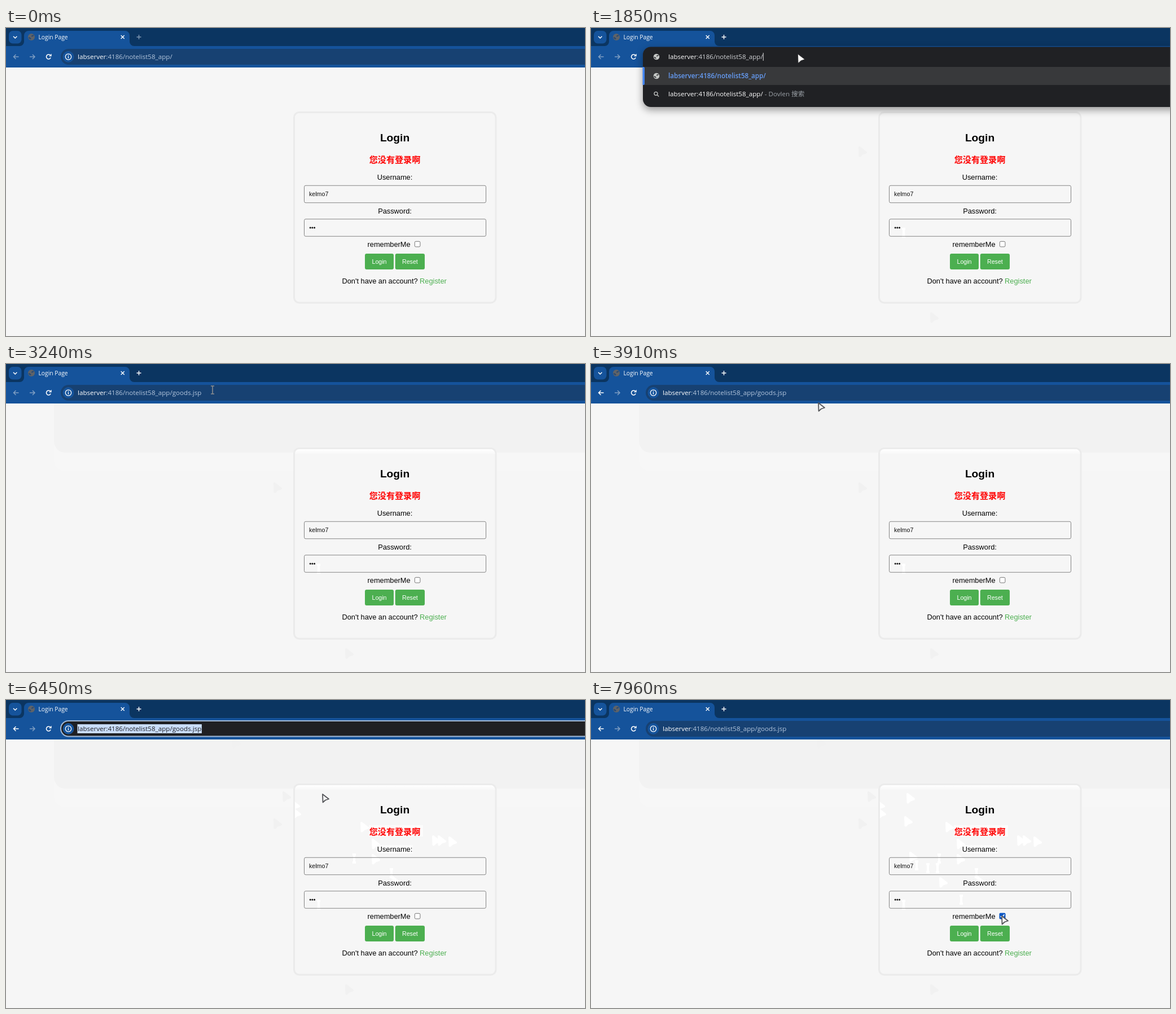
An HTML page with a canvas that plays this animation: 1026x546 px, repeating every 8 s.

```html
<!DOCTYPE html>
<html lang="en">
<head>
<meta charset="utf-8">
<title>Login Page</title>
<style>
html, body { margin: 0; width: 100%; height: 100%; overflow: hidden; background: #f6f6f6; }
canvas { display: block; }
</style>
</head>
<body>
<canvas id="stage" width="1026" height="546"></canvas>
<script>
const c = document.getElementById('stage').getContext('2d');
const LOOP = 8000;
const ARIAL = '"Liberation Sans", Arial, sans-serif';
const UI = '"Open Sans", "Noto Sans CJK SC", "Noto Sans CJK", sans-serif';
const CJK = '"Noto Sans CJK SC", "Noto Sans CJK", sans-serif';
const URL_FONT = '11.6px ' + UI, URL_BOLD = '600 11.6px ' + UI;
const HOST = 'labserver', PATH = ':4186/notelist58_app/', BASE = HOST + PATH, FILE = 'goods.jsp';
const BLUE = '#15539b', PAGE = '#f6f6f6', LINK = '#669df6';

const OPEN = 1760, ENTER = 3240;
// time, typed tail, suggestion rows
const TYPED = [
  [OPEN, '', 'us'], [2110, 'g', 'us'], [2450, 'go', 'uls'],
  [2640, 'goo', 'uls'], [2750, FILE, 'ls']
];

// the pointer passes the points of a stroke at an even pace, then rests
const moves = [];
let last = [602, 505];
function stroke(from, to, ...xy) {
  moves.push({ t: from, x: last[0], y: last[1], trace: true });
  const n = xy.length / 2;
  for (let i = 0; i < n; i++) {
    last = xy.slice(i * 2, i * 2 + 2);
    moves.push({ t: from + (to - from) * (i + 1) / n, x: last[0], y: last[1], trace: i < n - 1 });
  }
}
stroke(150, 620, 554, 363, 475, 211, 424, 149, 385, 116, 375, 104, 371, 83, 366, 46);
stroke(3870, 3910, 402, 68);
stroke(3950, 4560, 491, 163, 509, 193, 617, 281, 649, 274, 683, 307, 684, 313, 756, 241, 766, 241, 785, 243);
stroke(4700, 4840, 649, 247, 629, 217);
stroke(5030, 5160, 503, 190);
stroke(5370, 5960, 507, 179, 400, 52, 384, 53);
stroke(6110, 6160, 381, 56);
stroke(6340, 6450, 560, 166);
stroke(6500, 6620, 556, 207);
stroke(6760, 6960, 565, 270, 577, 293, 597, 298, 614, 298);
stroke(7240, 7300, 618, 315);
stroke(7460, 7780, 656, 354, 727, 382);

// areas where the pointer is a text beam: x, y, w, h
const FIELDS = [[528, 279, 323, 31], [528, 338.5, 323, 31]];
const TEXTS = [[97, 37, 929, 28], [663, 305, 56, 6], ...FIELDS];
const inside = (x, y, [l, t, w, h]) => x >= l && x <= l + w && y >= t && y <= t + h;
const isBeam = (x, y) => TEXTS.some(r => inside(x, y, r));
const between = (t, a, b) => t >= a && t < b;

function rect(x, y, w, h, r, fill, line, lw = 1) {
  c.beginPath();
  c.roundRect(x, y, w, h, r);
  if (fill) { c.fillStyle = fill; c.fill(); }
  if (line) { c.strokeStyle = line; c.lineWidth = lw; c.stroke(); }
}

function disc(x, y, r, fill, line, lw = 1) {
  c.beginPath();
  c.arc(x, y, r, 0, 7);
  if (fill) { c.fillStyle = fill; c.fill(); }
  if (line) { c.strokeStyle = line; c.lineWidth = lw; c.stroke(); }
}

function lines(color, lw, ...paths) {
  c.strokeStyle = color;
  c.lineWidth = lw;
  c.beginPath();
  for (const p of paths)
    for (let i = 0; i < p.length; i += 2) c[i ? 'lineTo' : 'moveTo'](p[i], p[i + 1]);
  c.stroke();
}

function text(s, x, y, font, color, align = 'left') {
  c.font = font;
  c.fillStyle = color;
  c.textAlign = align;
  c.fillText(s, x, y);
  return x + c.measureText(s).width;
}

// runs of [string, color, font], returns the end x
const runs = (x, y, list) =>
  list.reduce((at, [s, color, font = URL_FONT]) => text(s, at, y, font, color), x);

function pointerAt(t) {
  let i = 1;
  while (i < moves.length - 1 && moves[i].t < t) i++;
  const a = moves[i - 1], b = moves[i];
  const k = Math.min(1, Math.max(0, (t - a.t) / (b.t - a.t)));
  return [a.x + (b.x - a.x) * k, a.y + (b.y - a.y) * k];
}

function arrowPath(x, y) {
  c.beginPath();
  c.moveTo(x + 1, y + 1);
  c.lineTo(x + 12, y + 9.5);
  c.lineTo(x + 6, y + 11.5);
  c.lineTo(x + 1.5, y + 15.5);
  c.closePath();
}

function beam(x, y, color, lw) {
  lines(color, lw, [x - 3, y - 7, x + 3, y - 7], [x, y - 7, x, y + 7], [x - 3, y + 7, x + 3, y + 7]);
}

function pointer(t) {
  if (t < moves[0].t) return;
  const [x, y] = pointerAt(t), dark = y < 64;
  if (isBeam(x, y) && !between(t, OPEN, ENTER)) return beam(x, y, dark ? '#8b8d90' : '#555', 1.6);
  c.lineJoin = 'round';
  arrowPath(x, y);
  c.fillStyle = dark ? '#fff' : '#f4f4f4';
  c.fill();
  c.strokeStyle = dark ? '#3a3a3c' : '#55565a';
  c.lineWidth = 1.8;
  c.stroke();
  if (dark) c.fill();
  c.lineJoin = 'miter';
}

// faint marks left behind the pointer
function traces(t, inCard) {
  const color = inCard ? '#fff' : '#f1f1f1';
  c.lineJoin = 'round';
  for (const m of moves) {
    if (!m.trace || t < m.t + 50 || (m.x > 502 && m.y < 480) !== inCard) continue;
    if (m.t < OPEN && t >= OPEN && m.y < 165) continue;
    if (isBeam(m.x, m.y)) { beam(m.x, m.y, color, 4); continue; }
    arrowPath(m.x, m.y);
    c.fillStyle = c.strokeStyle = color;
    c.lineWidth = 4;
    c.fill();
    c.stroke();
  }
  c.lineJoin = 'miter';
}

function button(x, w, label) {
  rect(x, 400, w, 28, 3, '#4caf50');
  text(label, x + w / 2, 417.5, '10.67px ' + ARIAL, '#fff', 'center');
}

function card(t) {
  rect(510.5, 149.5, 357.5, 337.5, 9, PAGE, '#ebebeb', 3);
  c.save();
  c.beginPath();
  c.roundRect(512, 151, 354.5, 334.5, 8);
  c.clip();
  if (t >= ENTER) {
    const g = c.createLinearGradient(0, 151, 0, 160);
    g.addColorStop(0, '#fff');
    g.addColorStop(1, '#f7f7f7');
    c.fillStyle = g;
    c.fillRect(512, 151, 355, 9);
  }
  traces(t, true);
  c.restore();
}

function mark(t, on, ...box) {
  if (!on && t < 5200) return;
  c.fillStyle = on ? '#3367d1' : '#fcfcfc';
  c.fillRect(...box);
}

function form(t) {
  const pickHead = between(t, 4800, 5200), pickUser = between(t, 4730, 5200);
  mark(t, pickHead, 643, 222, 96, 20);
  mark(t, pickUser, 657, 257, 63.5, 15);

  const mid = 689, body = '12.8px ' + ARIAL;
  text('Login', mid, 201, 'bold 19.2px ' + ARIAL, '#000', 'center');
  text('您没有登录啊', mid, 238.7, 'bold 15.1px ' + CJK, pickHead ? '#fff' : '#f00', 'center');
  text('Username:', mid, 269, body, pickUser ? '#fff' : '#000', 'center');
  text('Password:', mid, 329, body, '#000', 'center');

  const [px, py] = pointerAt(t);
  for (const f of FIELDS) {
    const [x, y, w, h] = f;
    rect(x + .5, y + .25, w - 1, h - .5, 2.5, null, inside(px, py, f) ? '#555' : '#858585');
  }
  text('kelmo7', 537, 298, '10.67px ' + ARIAL, '#111');
  for (let i = 0; i < 3; i++) disc(539.2 + i * 3.7, 354, 1.5, '#111');

  text('rememberMe', 640.5, 388.3, body, '#000');
  if (t >= 7880) {
    rect(723.5, 377.5, 11, 11, 2, '#0b57c4');
    lines('#fff', 1.6, [725.8, 383.2, 728.2, 385.6, 732.4, 380.2]);
  } else {
    rect(724.3, 378.3, 9.6, 9.6, 2, '#fff', '#767676');
  }
  button(636, 51, 'Login');
  button(689.7, 52.3, 'Reset');
  const end = text("Don't have an account? ", 595.5, 453, body, '#000');
  text('Register', end, 453, body, '#4caf50');
}

function page(t) {
  c.fillStyle = PAGE;
  c.fillRect(0, 0, 1026, 546);
  if (t >= ENTER) {
    rect(85, 40, 960, 150, 20, '#f7f7f7');
    rect(85, 40, 960, 117, 20, '#f2f2f2');
  }
  traces(t, false);
  card(t);
  form(t);
}

function globe(x, y, r, color, gap) {
  disc(x, y, r, color);
  c.save();
  c.clip();
  c.fillStyle = gap;
  c.beginPath();
  c.ellipse(x - r * .45, y + r * .35, r * .45, r * .22, .6, 0, 7);
  c.ellipse(x + r * .35, y - r * .35, r * .4, r * .2, -.4, 0, 7);
  c.fill();
  c.restore();
}

function arrow(x, dir, color) {
  lines(color, 1.5, [x - 4.5 * dir, 51, x + 4.5 * dir, 51], [x + .5 * dir, 47, x + 4.5 * dir, 51, x + .5 * dir, 55]);
}

function tab() {
  c.fillStyle = BLUE;
  c.beginPath();
  c.moveTo(24, 32);
  c.arcTo(32, 32, 32, 24, 8);
  c.arcTo(32, 5, 40, 5, 8);
  c.arcTo(219, 5, 219, 13, 8);
  c.arcTo(219, 32, 227, 32, 8);
  c.fill();
  globe(45, 16, 6, '#5f6368', '#2c4a70');
  text('Login Page', 57.5, 20, '10.3px ' + UI, '#fff');
  lines('#fff', 1.4, [203.7, 13, 209.7, 19], [209.7, 13, 203.7, 19]);
}

function toolbar(t) {
  c.fillStyle = '#0b3561';
  c.fillRect(0, 0, 1026, 32);
  c.fillStyle = BLUE;
  c.fillRect(0, 32, 1026, 38);
  rect(5, 5, 22.5, 22.5, 7, BLUE);
  lines('#fff', 1.5, [13, 14.8, 16.2, 18, 19.4, 14.8]);
  tab();
  lines(t < 760 ? '#8199b3' : '#fff', 1.4, [231.5, 16, 239.5, 16], [235.5, 12, 235.5, 20]);

  const dim = '#7f9fc4';
  arrow(18, -1, t < 3330 ? dim : '#fff');
  arrow(46.5, 1, dim);
  c.strokeStyle = c.fillStyle = '#fff';
  c.lineWidth = 1.6;
  c.beginPath();
  c.arc(75.5, 51, 4, .4, 5.5);
  c.stroke();
  c.beginPath();
  c.moveTo(80.6, 45.6);
  c.lineTo(80.6, 50.2);
  c.lineTo(76, 50.2);
  c.fill();
}

function caret(x) {
  lines('#e8e8e8', 1, [x + .5, 44, x + .5, 58]);
}

function address(t) {
  const again = between(t, 5880, 6680);
  const focus = between(t, 760, ENTER) || again;
  const picked = between(t, 760, 1420) || again;
  if (focus) rect(97, 37, 960, 27.5, 13.7, '#1f2023', '#a3bad6', 2);
  else rect(97, 37, 960, 28, 14, '#174172');
  disc(110.5, 51, 10, BLUE);
  disc(110.5, 51, 5.2, null, '#fff', 1.3);
  c.fillStyle = '#fff';
  c.fillRect(109.8, 50, 1.4, 3.6);
  c.fillRect(109.8, 47.8, 1.4, 1.3);

  const tail = PATH + (t >= ENTER ? FILE : '');
  if (picked) {
    c.font = URL_FONT;
    c.fillStyle = '#c9ddfa';
    c.fillRect(126.5, 43, c.measureText(HOST + tail).width + 1, 16);
  }
  const end = runs(127, 55, [
    [HOST, picked ? '#1f2023' : '#fff'],
    [tail, picked ? '#1f2023' : focus ? '#c4c7cc' : '#b4c6dd']
  ]);
  if (focus && !picked) caret(end);
}

function dropdown(t) {
  const [, tail, rows] = TYPED.filter(s => s[0] <= t).pop();
  const bottom = 76 + rows.length * 32;
  c.save();
  c.shadowColor = 'rgba(0,0,0,.4)';
  c.shadowBlur = 14;
  c.shadowOffsetY = 5;
  rect(92, 33.5, 970, bottom - 33.5, 14, '#202124');
  c.restore();
  c.fillStyle = '#38393b';
  c.fillRect(92, 69, 934, 32);
  rect(91.5, 69, 3.5, 32, [0, 2, 2, 0], '#4285f4');

  const icon = '#c4c7c5', gap = '#3b3c3f', grey = '#9aa0a6';
  globe(116, 51, 5.3, icon, gap);
  caret(runs(137, 55, [[HOST, '#fff'], [PATH + tail, '#cfd1d4']]));

  const n = tail.length, title = 'Goods List', m = Math.min(n, 5);
  [...rows].forEach((kind, i) => {
    const y = 85 + i * 32.3;
    if (kind === 's') {
      disc(115, y - 1, 3, null, icon, 1.3);
      lines(icon, 1.3, [117.2, y + 1.2, 120.2, y + 4.2]);
      runs(137, y + 4, [[BASE + tail, '#fff'], [' - Dovlen 搜索', grey]]);
      return;
    }
    globe(116, y, 5.3, icon, gap);
    if (kind === 'u') runs(137, y + 4, [[BASE + tail, LINK, URL_BOLD]]);
    else runs(137, y + 4, [
      [title.slice(0, m), '#fff', URL_BOLD], [title.slice(m), '#fff'], [' - ', grey],
      [BASE + tail, LINK, URL_BOLD], [FILE.slice(n), LINK]
    ]);
  });
}

function frame(t) {
  page(t);
  toolbar(t);
  if (between(t, OPEN, ENTER)) dropdown(t);
  else address(t);
  pointer(t);
}

const start = performance.now();
function tick() {
  frame((performance.now() - start) % LOOP);
  requestAnimationFrame(tick);
}
tick();
</script>
</body>
</html>
```
